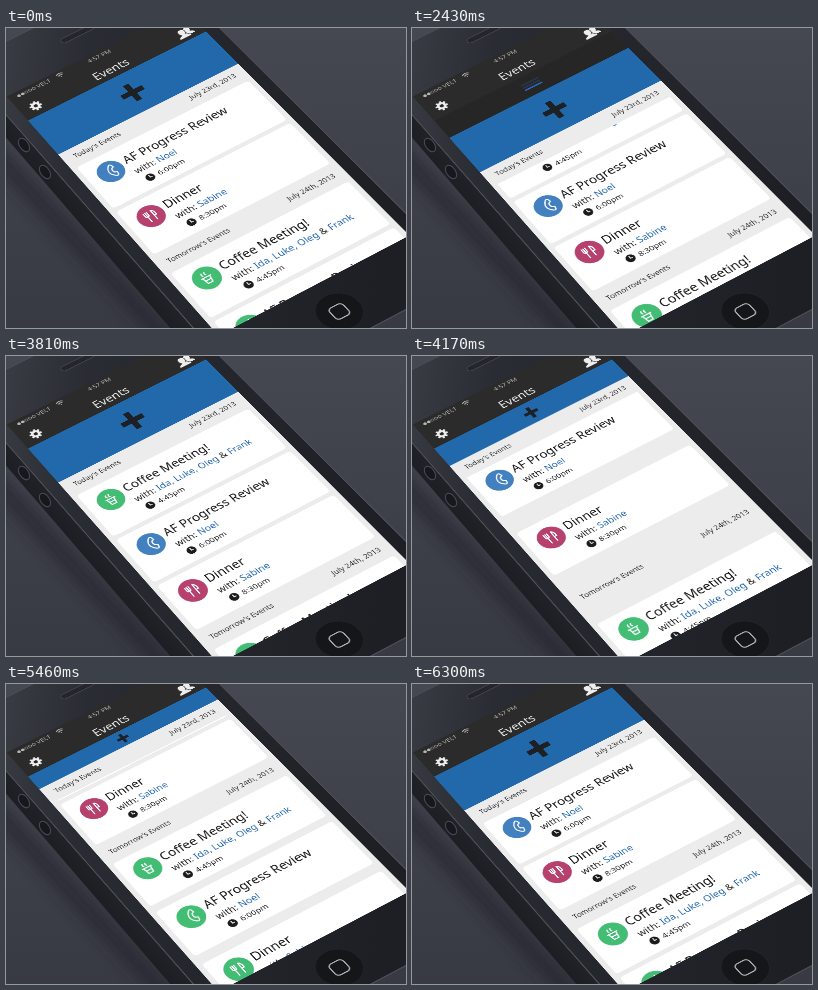
These frames come from a looping animation (400x300 px, 6330 ms). An HTML page:

```html
<!DOCTYPE html>
<html lang="en">
<head>
<meta charset="utf-8">
<style>
  html, body { margin: 0; width: 100%; height: 100%; overflow: hidden; background: #3a3c45; }
  svg { display: block; }
  #scene { position: relative; width: 100%; height: 100%; overflow: hidden; contain: strict; }
  #table { position: absolute; left: 0; top: 0; }
  /* Places the flat phone in perspective; its origin is the top left of the content. */
  #phone {
    position: absolute; left: -40px; top: -120px; transform-origin: 40px 120px;
    transform: matrix3d(.5285, -.26097, 0, .00003838, .33005, .36215, 0, -.00015803, 0, 0, 1, 0, 5.5, 66.1, 0, 1);
    font-family: "Noto Sans", "Open Sans", sans-serif;
  }
  .title { font-size: 21px; fill: #161616; }
  .with { font-size: 16px; fill: #222; }
  .with .who { fill: #2468ae; }
  .time { font-size: 13.5px; fill: #222; }
  .section { font-size: 12.5px; fill: #333; }
  .line { fill: none; stroke: #fff; stroke-width: 2; stroke-linecap: round; stroke-linejoin: round; }
</style>
</head>
<body>
<div id="scene">
<svg id="table" width="400" height="300">
  <defs>
    <linearGradient id="desk" x1="0" y1="0" x2="0" y2="1">
      <stop offset="0" stop-color="#454751"/><stop offset="1" stop-color="#383a43"/>
    </linearGradient>
    <linearGradient id="side" x1=".6" y1=".4" x2=".4" y2=".6">
      <stop offset="0" stop-color="#2b2d34"/><stop offset="1" stop-color="#1a1b20"/>
    </linearGradient>
    <filter id="soft"><feGaussianBlur stdDeviation="7"/></filter>
  </defs>
  <rect width="400" height="300" fill="url(#desk)"/>
  <path d="M-30 90L190 330H165L-30 120Z" fill="#22242a" opacity=".6" filter="url(#soft)"/>
  <path d="M-10 64L222 330H190L-10 98Z" fill="url(#side)"/>
  <g fill="#17181d" stroke="#4b4d56">
    <ellipse cx="18" cy="117" rx="4.500" ry="7.500" transform="rotate(-35 18 117)"/>
    <ellipse cx="39" cy="144" rx="4.500" ry="7.500" transform="rotate(-35 39 144)"/>
  </g>
</svg>

<svg id="phone" width="400" height="840" viewBox="-40 -120 400 840">
  <defs>
    <linearGradient id="glass" x1="0" y1="0" x2=".6" y2="1">
      <stop offset="0" stop-color="#41434c"/><stop offset=".3" stop-color="#2a2c33"/>
      <stop offset="1" stop-color="#1d1f25"/>
    </linearGradient>
  </defs>
  <rect x="-31" y="-105" width="382" height="795" rx="52" fill="url(#glass)" stroke="#4b4d55" stroke-width="2"/>
  <rect x="128" y="-57" width="64" height="11" rx="5.500" fill="#24262c" stroke="#565861"/>
  <circle cx="160" cy="641" r="34" fill="#15161a" stroke="#24262c"/>
  <rect x="148" y="629" width="24" height="24" rx="6" fill="none" stroke="#b0b0b3" stroke-width="2"/>
  <svg x="-9" width="338" height="582" viewBox="-9 0 338 582">
    <rect x="-9" width="338" height="582" fill="#ececec"/>
    <g id="list"></g>
    <g id="today"></g>
    <rect id="gap" x="-9" y="60" width="338" fill="#262626"/>
    <g id="loader" fill="#2a6fd0">
      <rect x="144" y="79" width="32" height="3"/>
      <rect x="144" y="85" width="32" height="3"/>
      <rect x="144" y="91" width="32" height="3"/>
    </g>
    <rect id="blue" x="-9" width="338" fill="#2269ac"/>
    <path id="plus" d="M-20 0H20M0 -20V20" stroke="#1d2025" stroke-width="10"/>
    <rect x="-9" width="338" height="64" fill="#2b2b2b"/>
    <g fill="#b4b4b4" font-size="11.5">
      <g id="signal" stroke="#b4b4b4"></g>
      <text x="42" y="14">VELT</text>
      <path d="M80 8q6-5 12 0M82.500 11q3.500-3 7 0M85 14h2" fill="none" stroke="#b4b4b4" stroke-width="1.700"/>
      <text x="160" y="15" text-anchor="middle">4:57 PM</text>
    </g>
    <text x="159" y="54" text-anchor="middle" font-size="21" fill="#eee">Events</text>
    <g transform="translate(18 44)" fill="none" stroke="#eee">
      <circle r="5.500" stroke-width="4.500"/>
      <circle r="8.500" stroke-width="3.500" stroke-dasharray="3.340"/>
    </g>
    <g fill="#eee">
      <path d="M297 54q0-5 6-6q-3-3-2-7q1-4 5-4t5 4q1 4-2 7q6 1 6 6z"/>
      <path d="M285 57q0-6 8-7q-4-4-3-8q1-5 6-5t6 5q1 4-3 8q8 1 8 7z" stroke="#2b2b2b"/>
    </g>
  </svg>
</svg>
</div>

<script>
const $ = id => document.getElementById(id);
const LOOP = 6330, NAV = 64, BLUE = 88, ROW = 110;

const glyphs = {
  phone: 'M2 -11q3-3 5 0l1 5l-4 2q-2 4 0 8l4 2l-1 5q-2 3-5 0q-11-10 0-22z',
  meal: 'M-8 -10v6q0 3 3 3t3-3v-6M-5 -10V10M5 10V-10q5 2 4 11h-4',
  coffee: 'M-6 -2H6L4 10H-4ZM-8 -2H8M-4 4H4M-3 -6q-2-2 0-5M2 -6q-2-2 0-5'
};
const blue = '#4280c0', rose = '#b6416f', green = '#43bd74';
const meeting = ['Coffee Meeting!', 'Ida, Luke, Oleg & Frank', '4:45pm', 'coffee'];
const review = ['AF Progress Review', 'Noel', '6:00pm', 'phone'];
const dinner = ['Dinner', 'Sabine', '8:30pm', 'meal'];

function card([title, who, time, glyph], color) {
  const names = who.replace(' &', '<tspan fill="#222"> &amp;</tspan>');
  return `<rect y="3" width="320" height="102" rx="5" fill="#fff"/>
    <circle cx="39" cy="40" r="22" fill="${color}"/>
    <path class="line" transform="translate(39 40)" d="${glyphs[glyph]}"/>
    <text class="title" x="67" y="41">${title}</text>
    <text class="with" x="69" y="67">with: <tspan class="who">${names}</tspan></text>
    <circle cx="82" cy="84" r="7.500" fill="#1c1c1c"/>
    <path d="M82 79v5h4" fill="none" stroke="#fff" stroke-width="1.600"/>
    <text class="time" x="96" y="89">${time}</text>`;
}

const section = (name, date) => `<rect x="-9" width="338" height="36" fill="#ececec"/>
  <text class="section" x="9" y="22">${name}</text>
  <text class="section" x="311" y="22" text-anchor="end">${date}</text>`;

// Each entry: resting position with the list fully open, then its content.
const rows = [
  [188, card(meeting, green)],
  [298, card(review, blue)],
  [408, card(dinner, rose)],
  [518, section("Tomorrow's Events", 'July 24th, 2013')],
  [554, card(meeting, green)],
  [664, card(review, green)],
  [774, card(dinner, green)]
];
$('list').innerHTML = rows.map(row => `<g>${row[1]}</g>`).join('');
$('today').innerHTML = section("Today's Events", 'July 23rd, 2013');
$('signal').innerHTML = [0, 1, 2, 3, 4].map(i =>
  `<circle cx="${8 + i * 7}" cy="10" r="2.500" ${i > 1 ? 'fill="none"' : ''}/>`).join('');

const clamp = x => Math.min(1, Math.max(0, x));
const ease = p => p < .5 ? 4 * p ** 3 : 1 - 4 * (1 - p) ** 3;
const slide = (t, from, to) => ease(clamp((t - from) / (to - from)));

// On the way up each row starts 30 ms after the one above and settles slowly.
function scrollUp(t, order) {
  const x = t - 3810 - 30 * order;
  return x > 0 ? 1 / (1 + (278 / x) ** 4.7) : 0;
}

// On the way back the lower rows lead.
function scrollBack(t, pos) {
  const start = 5634 - .55 * pos;
  return slide(t, start, start + 830);
}

function draw(t) {
  const pull = 45 * (slide(t, 150, 780) - slide(t, 2790, 3360));
  const hidden = ROW * (1 - slide(t, 2160, 2760));
  const height = BLUE - 55 * (scrollUp(t, 0) - scrollBack(t, 345));
  const top = NAV + pull;

  const move = (el, y) => el.setAttribute('transform', `translate(0 ${y})`);
  rows.forEach(([pos], i) => move($('list').children[i],
    pos + pull - hidden - 268 * scrollUp(t, i + 1) + 158 * scrollBack(t, pos)));
  move($('today'), top + height);
  $('blue').setAttribute('y', top);
  $('blue').setAttribute('height', height);
  $('plus').setAttribute('transform',
    `translate(159 ${top + height / 2}) scale(${.2 + .8 * height / BLUE})`);
  $('gap').setAttribute('height', pull + 5);
  [...$('loader').children].forEach((bar, i) =>
    bar.setAttribute('opacity', .55 + .45 * Math.sin(t / 100 - i * 1.6)));
}

function tick() {
  draw(performance.now() % LOOP);
  requestAnimationFrame(tick);
}
tick();
</script>
</body>
</html>
```
